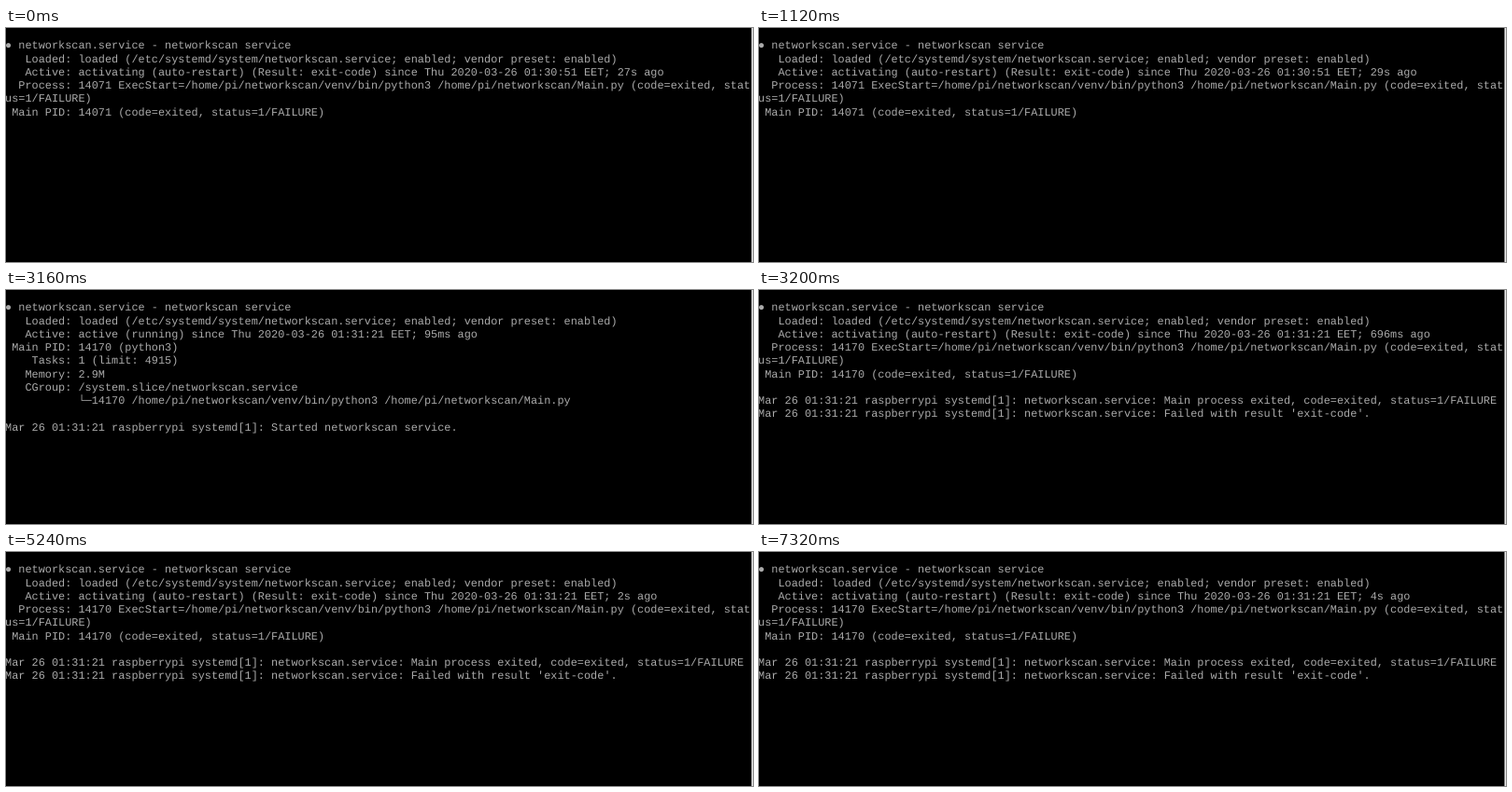
An HTML page with a canvas that plays this animation: 800 by 251 pixels, repeating every 8.2 s.

```html
<!DOCTYPE html>
<html>
<head>
<meta charset="utf-8">
<title>Service status</title>
<style>
  html, body { margin: 0; width: 100%; height: 100%; overflow: hidden; background: #000; }
  canvas { display: block; }
</style>
</head>
<body>
<canvas id="stage" width="800" height="251"></canvas>
<script>
const LOOP = 8200;
const SCALE = .891, LINE = 16, LEFT = -1, BASELINE = 22.4;
const ctx = document.getElementById('stage').getContext('2d');
const command = '/home/pi/networkscan/venv/bin/python3 /home/pi/networkscan/Main.py';
const log = 'Mar 26 01:31:21 raspberrypi systemd[1]: ';
const header = `● networkscan.service - networkscan service
   Loaded: loaded (/etc/systemd/system/networkscan.service; enabled; vendor preset: enabled)
   Active: `;

const failed = (pid, time, age) => header +
`activating (auto-restart) (Result: exit-code) since Thu 2020-03-26 ${time} EET; ${age} ago
  Process: ${pid} ExecStart=${command} (code=exited, stat
us=1/FAILURE)
 Main PID: ${pid} (code=exited, status=1/FAILURE)`;

const before = age => failed(14071, '01:30:51', age);
const after = age => failed(14170, '01:31:21', age) + `

${log}networkscan.service: Main process exited, code=exited, status=1/FAILURE
${log}networkscan.service: Failed with result 'exit-code'.`;

const running = header +
`active (running) since Thu 2020-03-26 01:31:21 EET; 95ms ago
 Main PID: 14170 (python3)
    Tasks: 1 (limit: 4915)
   Memory: 2.9M
   CGroup: /system.slice/networkscan.service
           └─14170 ${command}

${log}Started networkscan service.`;

// Each refresh of the status output: [start in ms, text]
const refreshes = [
  [0, before('27s')],
  [80, before('28s')],
  [1120, before('29s')],
  [2160, running],
  [3200, after('696ms')],
  [4200, after('1s')],
  [5240, after('2s')],
  [6280, after('3s')],
  [7320, after('4s')],
];

function paint(text) {
  ctx.resetTransform();
  ctx.fillStyle = '#000';
  ctx.fillRect(0, 0, 800, 251);
  ctx.fillStyle = '#e8e8e8';
  ctx.fillRect(798.4, 0, 1.6, 251);

  // The tiny skew turns off glyph hinting and baseline snapping.
  ctx.setTransform(SCALE, 1e-5, 1e-5, SCALE, LEFT, BASELINE);
  ctx.font = '13.333px "Liberation Mono", monospace';
  ctx.textRendering = 'geometricPrecision';
  ctx.fillStyle = '#aaa';
  text.split('\n').forEach((line, row) => ctx.fillText(line, 0, row * LINE));
}

const start = performance.now();
let shown;
function draw() {
  const t = (performance.now() - start) % LOOP;
  const text = refreshes.findLast(([from]) => from <= t)[1];
  if (text !== shown) paint(shown = text);
  requestAnimationFrame(draw);
}
draw();
</script>
</body>
</html>
```
